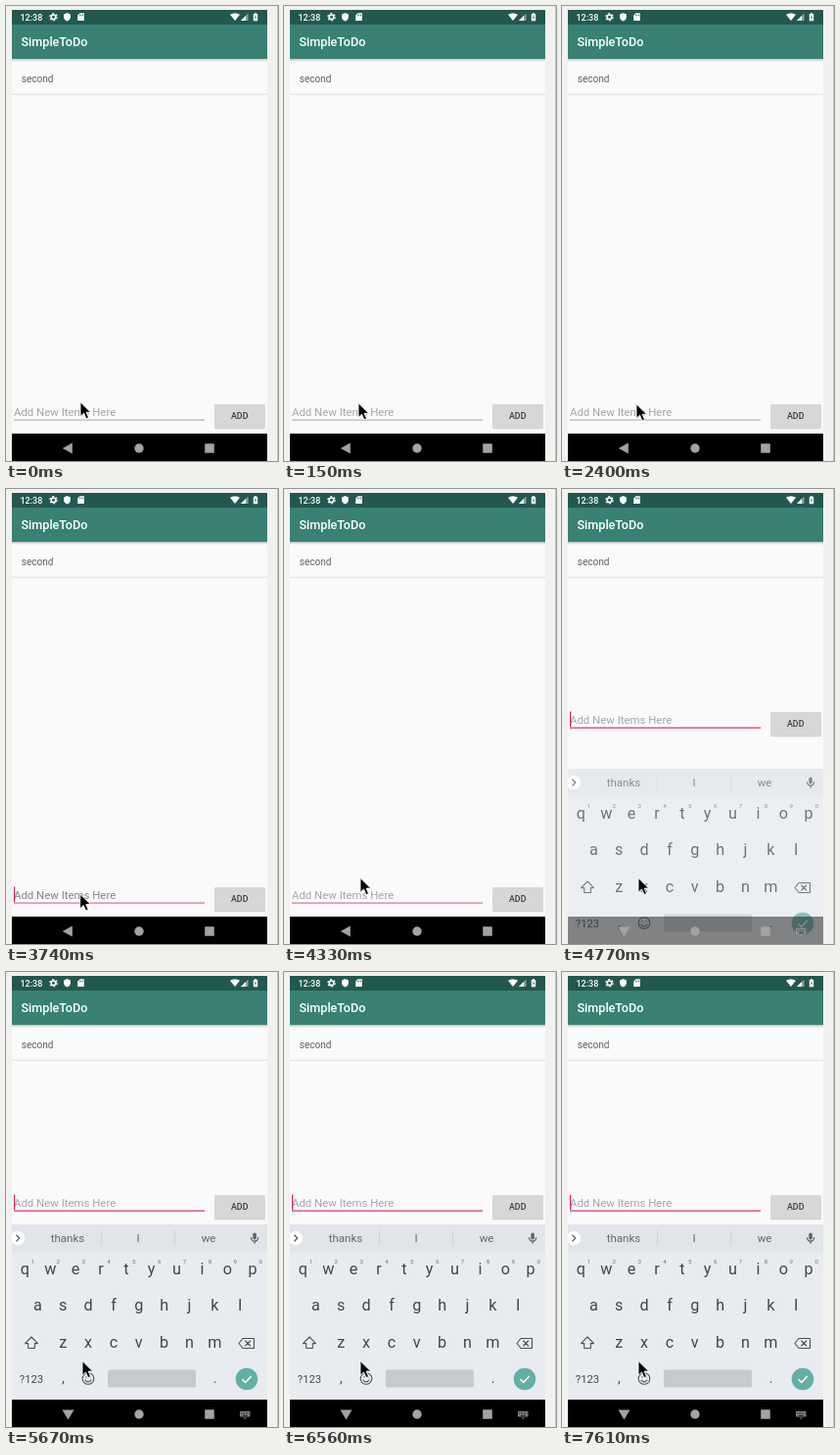
Write an HTML page that moves like this. It is 278 px wide and 465 px high and loops after 8 s.

```html
<!DOCTYPE html>
<html lang="en">
<head>
<meta charset="utf-8">
<title>To-do list</title>
<style>
html, body { margin: 0; width: 100%; height: 100%; overflow: hidden; background: #f1f1f0; }
svg { display: block; width: 278px; height: 465px; font-family: Roboto, sans-serif; }
.mid { text-anchor: middle; }
.bold { font-weight: 500; }
.line { fill: none; stroke: #4a5156; stroke-width: 1.1; stroke-linejoin: round; stroke-linecap: round; }
</style>
</head>
<body>
<svg viewBox="0 0 278 465">
  <defs>
    <clipPath id="screen"><rect x="6" y="4" width="261" height="461"/></clipPath>
    <linearGradient id="shade" x2="0" y2="1">
      <stop stop-color="#000" stop-opacity=".22"/>
      <stop offset="1" stop-color="#000" stop-opacity="0"/>
    </linearGradient>
  </defs>
  <rect width="278" height="465" fill="#f1f1f0"/>
  <rect x="277" width="1" height="465" fill="#c9c9c9"/>
  <g clip-path="url(#screen)">
    <rect x="6" y="4" width="261" height="461" fill="#fafafa"/>
    <rect x="6" y="54" width="261" height="3" fill="url(#shade)"/>
    <rect x="6" y="19" width="261" height="35" fill="#388174"/>
    <rect x="6" y="4" width="261" height="15" fill="#22584d"/>

    <g fill="#fff">
      <text class="bold" x="14.5" y="14.6" font-size="9">12:38</text>
      <circle cx="48.5" cy="11.3" r="2.3" fill="none" stroke="#fff" stroke-width="1.6"/>
      <circle cx="48.5" cy="11.3" r="3.6" fill="none" stroke="#fff" stroke-width="1.3" stroke-dasharray="1.9"/>
      <path d="M62.5 7l3.4 1.4v2.8c0 2-1.4 3.6-3.4 4.3c-2-.7-3.4-2.3-3.4-4.3V8.400z"/>
      <path d="M75.500 7.300H79.800V15H73.200V9.600z"/>
      <path d="M75.500 8.600v1.700M77 8.600v1.700M78.500 8.600v1.700" stroke="#22584d" stroke-width=".7"/>
      <path d="M229 8.800Q234 5.600 239 8.800L234 15z"/>
      <path d="M247.500 7.500V15H240z" fill-opacity=".45"/>
      <path d="M245 10V15H240z"/>
      <path d="M254 7h2v.9h1.200V15.300H252.800V7.900H254z"/>
      <path d="M255.500 9l-1.500 2.800h1l-.4 2.200 1.500-2.800h-1z" fill="#22584d"/>
    </g>
    <text class="bold" x="15.500" y="41" font-size="12.600" fill="#fff">SimpleToDo</text>
    <text x="15.700" y="78" font-size="10.100" fill="#626262">second</text>
    <rect x="6" y="89.700" width="261" height="1" fill="#dedede"/>

    <g id="entry">
      <text id="hint" x="8" y="418.700" font-size="11.400">Add New Items Here</text>
      <rect id="rule" x="8" y="422.400" width="195" height="1.400"/>
      <rect id="caret" x="8" y="406.500" width="1.200" height="15.500" fill="#d81b60"/>
      <rect x="213" y="408.200" width="52" height="24" rx="1.500" fill="#000" opacity=".16"/>
      <rect x="213" y="407" width="52" height="24" rx="1.300" fill="#d6d7d7"/>
      <text class="mid bold" x="238.700" y="422.200" font-size="8.900" fill="#3c3c3c">ADD</text>
    </g>

    <g id="keyboard">
      <rect x="6" y="258" width="261" height="207" fill="#e8ecf0"/>
      <rect x="6" y="258" width="261" height="28.500" fill="#e1e5e9"/>
      <circle cx="12" cy="272" r="7.200" fill="#fff"/>
      <path class="line" d="M10.800 269l2.900 3-2.900 3"/>
      <path d="M97.500 264v16M172.500 264v16" stroke="#cdd2d6"/>
      <g class="mid" font-size="11.500" fill="#5f676c">
        <text x="63" y="276">thanks</text>
        <text x="135" y="276">I</text>
        <text x="207" y="276">we</text>
      </g>
      <rect x="252.300" y="266.500" width="3.600" height="7" rx="1.800" fill="#5f676c"/>
      <path class="line" d="M250.500 271.500a3.600 3.600 0 0 0 7.200 0M254.100 275.300v2"/>
      <g id="keys" class="mid" fill="#3f474c"></g>
      <path class="line" d="M26 373l6.500 6.600H29.300V384.500H22.700V379.600H19.500z"/>
      <path class="line" d="M238 379.500l4-5H253.500V384.500H242zM244.700 377l5 5M249.700 377l-5 5"/>
      <g class="mid" fill="#3f474c">
        <text x="26" y="419.600" font-size="11.300">?123</text>
        <text x="58.500" y="419.600" font-size="14">,</text>
        <text x="213.500" y="419.600" font-size="14">.</text>
      </g>
      <circle class="line" cx="84" cy="415.500" r="5.800"/>
      <path class="line" d="M81 417.200q3 3.400 6 0M82 413.600v.4M86 413.600v.4"/>
      <rect x="104" y="406.500" width="90" height="18" rx="1.500" fill="#c5cacd"/>
      <circle cx="246" cy="416" r="11.300" fill="#63afa6"/>
      <path d="M241.500 416.200l3.200 3.200 6-6.400" fill="none" stroke="#fff" stroke-width="1.500"/>
    </g>

    <rect id="nav" x="6" y="437" width="261" height="28"/>
    <g fill="#a3a3a3">
      <path id="back"/>
      <circle cx="136" cy="452" r="4.700"/>
      <rect x="203.200" y="447.200" width="9.600" height="9.600" rx=".6"/>
      <g id="switcher" opacity=".8">
        <rect x="239" y="448.800" width="10.500" height="5.600" rx=".6"/>
        <path d="M240 450.300h8.500M240 451.800h8.500" stroke="#000" stroke-width=".7" stroke-dasharray=".8"/>
        <path d="M241.800 453.400h5" stroke="#000" stroke-width=".7"/>
        <path d="M242.500 455.400h3.600l-1.800 1.700z"/>
      </g>
    </g>
  </g>
  <path id="pointer" d="M.5.7V15.500L4 12.200 6.400 17.800 9 16.700 6.600 11.300H11.200z" fill="#000" stroke="#fff" stroke-width=".9" stroke-linejoin="round"/>
</svg>
<script>
const LOOP = 8000, PITCH = 25.86;
const $ = id => document.getElementById(id);
const set = (id, attrs) => {
  for (const k in attrs) $(id).setAttribute(k, attrs[k]);
};
const show = (id, on) => set(id, { visibility: on ? "visible" : "hidden" });

function addKey(label, x, y, size, fill) {
  const el = document.createElementNS("http://www.w3.org/2000/svg", "text");
  el.textContent = label;
  el.setAttribute("x", x);
  el.setAttribute("y", y);
  el.setAttribute("font-size", size);
  if (fill) el.setAttribute("fill", fill);
  $("keys").append(el);
}

[["qwertyuiop", 19.4, 308.7], ["asdfghjkl", 32.4, 346.2], ["zxcvbnm", 58.2, 384]].forEach(([row, x, y], r) => {
  [...row].forEach((ch, i) => {
    addKey(ch, x + i * PITCH, y, 16.2);
    if (r === 0) addKey((i + 1) % 10, x + 8 + i * PITCH, 297.5, 6.2, "#6a7277");
  });
});

// [start, x, y]: the pointer jumps between these spots
const stops = [
  [0, 75.5, 404], [150, 75.5, 405], [2400, 75.5, 406], [2540, 75.2, 410.5],
  [2690, 75.2, 413.3], [4190, 77, 400.5], [4330, 77.5, 396.8]
];
// the caret flips at each of these times
const blinks = [3740, 4040, 4630, 6110, 6560, 7010, 7610];

function draw(t) {
  const focused = t >= 3740, raised = t >= 4480;
  const sliding = t >= 4770 && t < 5670;
  const [, px, py] = stops.filter(s => s[0] <= t).pop();

  set("pointer", { transform: `translate(${px} ${py})` });
  set("entry", { transform: `translate(0 ${raised ? -179 : 0})` });
  set("hint", { fill: focused && t < 3890 ? "#858585" : "#a6a6a6" });
  set("rule", { fill: raised ? "#d94a78" : focused ? "#df83a6" : "#bdbdbd" });
  show("caret", blinks.filter(b => b <= t).length % 2);

  show("keyboard", t >= 4770);
  set("keyboard", {
    transform: `translate(0 ${sliding ? 28 : 0})`,
    opacity: sliding ? 0.75 : 1
  });
  set("nav", { opacity: sliding ? 0.46 : 1 });
  set("back", {
    d: raised ? "M57.500 447.500H69.500L63.500 457.500z" : "M67.800 446.600V457.400L57.800 452z"
  });
  show("switcher", raised);
}

const start = performance.now();
function tick() {
  draw((performance.now() - start) % LOOP);
  requestAnimationFrame(tick);
}
tick();
</script>
</body>
</html>
```
